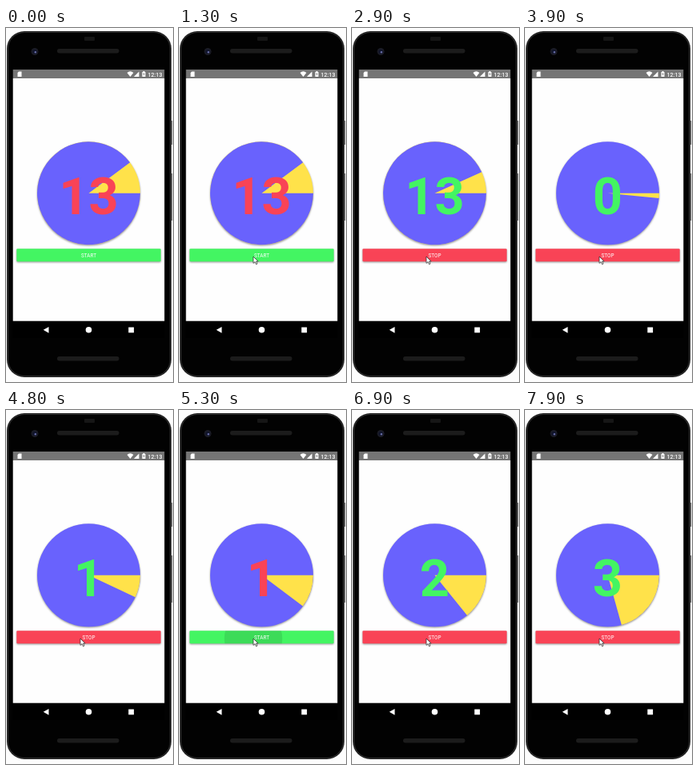
An HTML page that plays this animation: 209 by 443 pixels, repeating every 8 s.

```html
<!DOCTYPE html>
<html lang="en">
<head>
<meta charset="utf-8">
<title>Timer</title>
<style>
  html, body { margin: 0; width: 100%; height: 100%; overflow: hidden; background: #fdfdfd; }
  svg { display: block; width: 209px; height: 443px; }
  text { font-family: Roboto, sans-serif; text-anchor: middle; }
  .shadow { filter: drop-shadow(0 1px 1.2px rgba(0, 0, 0, .42)); }
</style>
</head>
<body>
<svg viewBox="0 0 209 443">
  <defs>
    <clipPath id="buttonClip"><rect x="13.300" y="276.300" width="180.400" height="16" rx="1"/></clipPath>
  </defs>

  <!-- phone -->
  <path d="M206 116h2.300v30H206zM206 182h2.300v59H206z" fill="#777"/>
  <rect x="1" y="4" width="206" height="433" rx="22" fill="#1c1c1c"/>
  <rect x="2.500" y="5.500" width="203" height="430" rx="20.500" fill="#020202" stroke="#3a3a3a" stroke-width=".8"/>
  <rect x="98" y="11" width="13" height="5" rx="1" fill="#161616"/>
  <rect x="64" y="26" width="77.500" height="5.500" rx="2.700" fill="#1c1c1c"/>
  <rect x="64" y="411" width="77.500" height="5.500" rx="2.700" fill="#1c1c1c"/>
  <circle cx="36" cy="29.500" r="4.500" fill="#1b1c26"/>
  <circle cx="36" cy="29.500" r="2.600" fill="#10142c"/>
  <circle cx="36.800" cy="30.200" r="1.200" fill="#6a70a8"/>

  <!-- screen -->
  <rect x="8.700" y="52" width="189.600" height="336" fill="#000"/>
  <rect x="8.700" y="52" width="189.600" height="11" fill="#757575"/>
  <rect x="8.700" y="63" width="189.600" height="303.700" fill="#fefefe"/>
  <g fill="#fff">
    <path d="M16 54.500h3.500v6.500h-5v-5z"/>
    <path d="M151.500 56q4-3.500 8 0l-4 5z"/>
    <path d="M166.500 54.500v6.500h-6.500z"/>
    <path d="M170.500 55h1v-1h2v1h1v6h-4z"/>
    <path d="M172.700 55.800l-1.300 2.200h1l-.2 2 1.500-2.500h-1z" fill="#757575"/>
    <text x="186.500" y="60.500" font-size="7" font-weight="500">12:13</text>
    <path d="M46.700 377.800l6.800-3.900v7.800z"/>
    <circle cx="103.500" cy="377.800" r="3.800"/>
    <rect x="153.300" y="374.500" width="6.800" height="6.800"/>
  </g>

  <!-- timer -->
  <circle class="shadow" id="dial" cx="103.500" cy="206.800" r="64.500"/>
  <path id="sector"/>
  <text id="count" x="103.500" y="232.800" font-size="65" font-weight="700"></text>

  <g class="shadow"><rect id="button" x="13.300" y="276.300" width="180.400" height="16" rx="1"/></g>
  <circle id="ripple" cx="93" cy="286" clip-path="url(#buttonClip)" fill="#000"/>
  <text id="label" x="103.500" y="286.800" font-size="6.400" fill="#fff"></text>

  <path id="cursor" d="M0 0v8.400l2-1.800 1.500 3.200 1.500-.7-1.500-3.100h2.600z" fill="#fff" stroke="#222" stroke-width=".7"/>
</svg>
<script>
const LOOP = 8000, STEP = 100, LAP = 15;
const BLUE = '#6962fd', YELLOW = '#ffe24a', GREEN = '#43f562', RED = '#f94356';
const CX = 103.5, CY = 206.8, R = 64.5;
const presses = [2000, 5200, 6200];
const seconds = [[2100, 13.47], [2900, 13.99], [3900, 15.23], [4800, 16.05],
                 [5300, 16.54], [6300, 16.54], [7900, 18.1]];
const cursorX = [[500, 4], [700, 30], [900, 64], [1100, 88], [1300, 93]];
const cursorY = [[500, 326], [700, 312], [900, 294], [1100, 282], [1300, 286]];
const $ = id => document.getElementById(id);
const set = (id, attrs) => {
  for (const key in attrs) $(id).setAttribute(key, attrs[key]);
};

function track(points, t) {
  if (t <= points[0][0]) return points[0][1];
  for (let i = 1; i < points.length; i++) {
    const [t0, a] = points[i - 1], [t1, b] = points[i];
    if (t <= t1) return a + (b - a) * (t - t0) / (t1 - t0);
  }
  return points[points.length - 1][1];
}

function sectorPath(turn) {
  const a = turn * 2 * Math.PI;
  const x = CX + R * Math.cos(a), y = CY + R * Math.sin(a);
  return `M${CX} ${CY}H${CX + R}A${R} ${R} 0 ${turn > .5 ? 1 : 0} 1 ${x} ${y}Z`;
}

function draw(t) {
  const value = track(seconds, t), lap = value % LAP;
  const firstLap = value < LAP;
  const running = (t >= 2100 && t < 5300) || t >= 6300;

  set('dial', { fill: firstLap ? YELLOW : BLUE });
  set('sector', { d: sectorPath(lap / LAP), fill: firstLap ? BLUE : YELLOW });
  set('count', { fill: running ? GREEN : RED });
  $('count').textContent = Math.floor(lap);
  set('button', { fill: running ? RED : GREEN });
  $('label').textContent = running ? 'STOP' : 'START';

  const age = Math.min(...presses.map(p => t >= p ? t - p : Infinity));
  const p = Math.min(1, (age + STEP) / 800);
  set('ripple', { r: 10 + 105 * p, opacity: .14 * (1 - p) });

  set('cursor', {
    transform: `translate(${track(cursorX, t)} ${track(cursorY, t)})`,
    visibility: t >= 500 ? 'visible' : 'hidden'
  });
}

const start = performance.now();
function tick() {
  const t = (performance.now() - start) % LOOP;
  draw(Math.floor(t / STEP) * STEP);
  requestAnimationFrame(tick);
}
tick();
</script>
</body>
</html>
```
